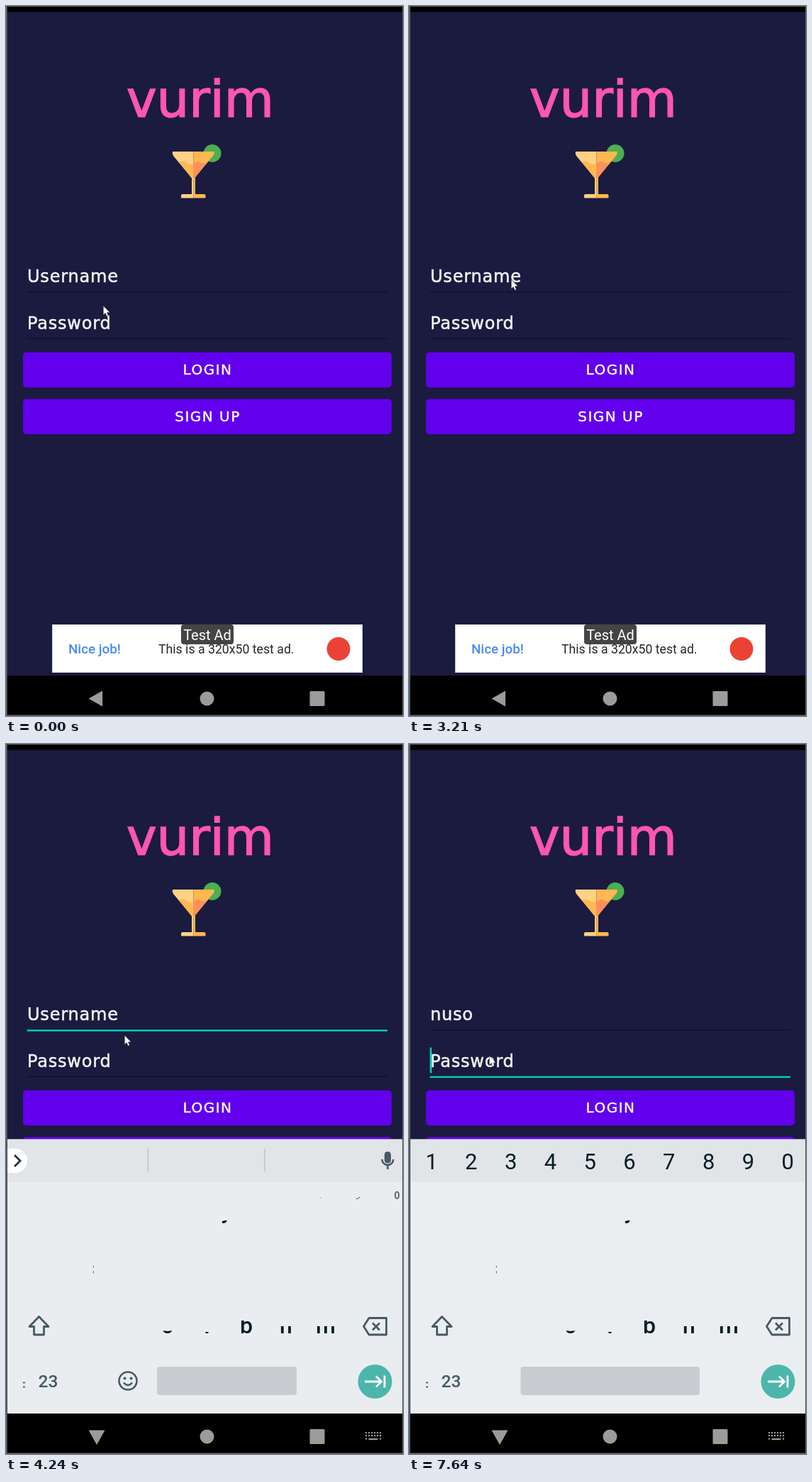
Write an HTML page with a canvas that moves like this. It is 560 px wide and 1000 px high and loops after 8 s.

```html
<!DOCTYPE html>
<html lang="en">
<head>
<meta charset="utf-8">
<title>Login screen</title>
<style>
html, body { margin: 0; width: 100%; height: 100%; overflow: hidden; background: #1b1b3f; }
canvas { display: block; width: 560px; height: 1000px; }
</style>
</head>
<body>
<canvas id="stage" width="560" height="1000"></canvas>
<script>
const screen2d = document.getElementById('stage').getContext('2d');
const layer = new OffscreenCanvas(560, 1000).getContext('2d');
let ctx = screen2d;

const LOOP = 8000, TICK = LOOP / 60, BLINK = 500;
const WIDE = '"DejaVu Sans", sans-serif';
const UI = 'Roboto, sans-serif';
const TEAL = '#00d3bb', SLATE = '#455a64', INK = '#0b1c24', NAV = '#9b9b9b';
const NAME = 'nuso';

// Moments of the story, in ms.
const FOCUS_NAME = 3590, NAV_OPEN = 3970, RISE = 4120, RISEN = 4240;
const KEYS = [4390, 5350, 5500, 5750];
const FOCUS_SECRET = 7520, DIGITS = 7640;

// Pointer tip as [tick, x, y]; between ticks 5 and 17 it swirls instead.
const PATH = [
  [0, 137, 422], [3, 269, 808], [5, 160, 838], [17, 274, 838], [19, 247, 897],
  [21, 173, 503], [24, 144, 385], [28, 167, 410], [51, 167, 410], [54, 113, 439]
];

function pointerAt(t) {
  const k = Math.floor((t + 20) / TICK);
  if (k >= 5 && k <= 17) {
    return [220 + 9.5 * (k - 5) - 60 * Math.cos(Math.PI * (k - 5) / 2),
      865 + 54 * Math.cos(2 * Math.PI * (k - 10) / 3)];
  }
  const next = PATH.findIndex(p => p[0] > k);
  if (next < 0) return PATH.at(-1).slice(1);
  const [k0, x0, y0] = PATH[next - 1], [k1, x1, y1] = PATH[next];
  const f = (k - k0) / (k1 - k0);
  return [x0 + (x1 - x0) * f, y0 + (y1 - y0) * f];
}

// The caret restarts its blink at every focus and key press.
function caretOn(t) {
  const last = [FOCUS_NAME, ...KEYS, FOCUS_SECRET].filter(e => e <= t).pop();
  return Math.floor((t - last) / BLINK) % 2 === 0;
}

function rect(x, y, w, h, color) {
  ctx.fillStyle = color;
  ctx.fillRect(x, y, w, h);
}

function round(x, y, w, h, r, color) {
  ctx.fillStyle = color;
  ctx.beginPath();
  ctx.roundRect(x, y, w, h, r);
  ctx.fill();
}

function disc(x, y, r, color) {
  ctx.fillStyle = color;
  ctx.beginPath();
  ctx.arc(x, y, r, 0, Math.PI * 2);
  ctx.fill();
}

function shape(d, color) {
  ctx.fillStyle = color;
  ctx.fill(new Path2D(d));
}

function line(d, color, width) {
  ctx.strokeStyle = color;
  ctx.lineWidth = width;
  ctx.stroke(new Path2D(d));
}

function text(s, x, y, font, color, align = 'left', spacing = 0) {
  ctx.font = font;
  ctx.fillStyle = color;
  ctx.textAlign = align;
  ctx.letterSpacing = spacing + 'px';
  ctx.fillText(s, x, y);
  return ctx.measureText(s).width;
}

// Wide lettering, thickened a little by an outline.
function wideText(s, x, y, size, color, align, spacing) {
  const width = text(s, x, y, size + 'px ' + WIDE, color, align, spacing);
  ctx.strokeStyle = color;
  ctx.lineWidth = size * 0.022;
  ctx.strokeText(s, x, y);
  return width;
}

// Only the band of the glyph between top and bottom is visible.
function band(s, x, y, top, bottom) {
  ctx.save();
  ctx.beginPath();
  ctx.rect(0, top, 560, bottom - top);
  ctx.clip();
  text(s, x, y, '500 32px ' + UI, INK, 'center');
  ctx.restore();
}

function drawGlass() {
  disc(291, 207.5, 12.5, '#4caf50');
  shape('M235 205H264.5V244Q262 243 260 240L236 211Q234 208 235 205Z', '#ffd184');
  shape('M264.5 205H294Q294 209 292 211L268 240Q266 243 264.5 244Z', '#ffb74f');
  shape('M244 220Q250 217 255 221T264.5 222V244Q262 243 260 240Z', '#ffb750');
  shape('M264.5 222Q269 217 274 220T284 220L268 240Q266 243 264.5 244Z', '#ff8f5c');
  rect(262, 242, 2.5, 24, '#ffd184');
  rect(264.5, 242, 2.5, 24, '#ffb74f');
  round(247, 265, 17.5, 5.5, [2, 0, 0, 1], '#ffd184');
  round(264.5, 265, 17, 5.5, [0, 2, 1, 0], '#ffb74f');
}

function drawField(typed, hint, y, focused, caret) {
  const width = wideText(typed || hint, 30, y, 24, '#f4f4f8', 'left', 0.8);
  if (focused && typed) rect(30, y + 0.5, width, 1.5, '#f4f4f8');
  if (focused) rect(29.5, y + 13.3, 508.5, 2.4, TEAL);
  else rect(29.5, y + 13.3, 508.5, 1.3, '#0f0f26');
  if (focused && caret) rect(typed ? 29.5 + width : 29.5, y - 27, 2.5, 36, TEAL);
}

function drawButton(label, y) {
  round(24, y + 1.5, 520, 50, 5, 'rgba(0,0,0,.15)');
  round(24, y, 520, 49.7, 5, '#6200ee');
  wideText(label, 284.5, y + 31.3, 20, '#fff', 'center', 1.5);
}

function drawAd() {
  rect(65, 871, 438, 68, '#dcdcec');
  rect(66, 872, 436, 66, '#fff');
  text('Nice job!', 88, 912, '500 18.8px ' + UI, '#4a8af4');
  text('This is a 320x50 test ad.', 215, 912, '17.7px ' + UI, '#26282b');
  disc(469, 905.5, 16.5, '#ea4335');
  round(247, 871, 74, 28, 4, '#444');
  text('Test Ad', 284, 893, '20px ' + UI, '#fff', 'center');
}

function drawSuggestions(typing) {
  round(2, 570, 28, 34, [0, 17, 17, 0], '#fff');
  line('M12 579L20 587L12 595', '#263238', 2.8);
  rect(199.5, 570, 1.5, 32, '#c0c4c7');
  rect(364, 570, 1.5, 32, '#c0c4c7');
  if (typing) text('d', 457, 597, '25px ' + UI, '#59666c', 'center');
  round(533.8, 574, 9.2, 16.5, 4.6, SLATE);
  line('M530.5 585A7.9 8 0 0 0 546.3 585M538.4 593V599', SLATE, 2.6);
  text('0', 551.5, 641, 'bold 14px ' + UI, '#5c686e', 'center');
  rect(443.5, 638.5, 1, 1, '#5c686e');
  line('M494 640.5Q497 641 499 638', '#5c686e', 1.2);
}

function drawDigits() {
  for (let i = 0; i < 10; i++) {
    text(String((i + 1) % 10), 32 + i * 55.8, 599, '31px ' + UI, INK, 'center');
  }
}

function drawKeys() {
  band('y', 311, 669, 671, 678);
  rect(122.8, 735, 1, 2.5, SLATE);
  rect(122.8, 742.5, 1, 3, SLATE);
  band('c', 227.5, 830, 826.5, 832);
  band('v', 283.5, 830, 828, 831);
  band('b', 339, 830, 812, 832);
  band('n', 395, 830, 820, 831);
  band('m', 451, 830, 820, 831);
  ctx.lineJoin = 'round';
  line('M46.5 806.5L60 820.5H53.5V832H39.5V820.5H33Z', SLATE, 2.8);
  line('M512 808.5H536.5V832H512L504.5 820.3Z', SLATE, 2.8);
  ctx.lineJoin = 'miter';
  line('M517 815.5L527 825.5M527 815.5L517 825.5', SLATE, 2.8);
  rect(24, 898.5, 2.8, 2, SLATE);
  rect(24, 904.5, 2.8, 2, SLATE);
  text('23', 45.5, 906, '500 24.5px ' + UI, SLATE);
  disc(520.5, 898, 24, '#4db6ac');
  line('M506 898H529M522 890.5L529.5 898L522 905.5M534 889.5V906.5', '#fff', 2.8);
}

function drawSmiley() {
  line('M184.5 897A12.5 12.5 0 1 1 159.5 897A12.5 12.5 0 1 1 184.5 897', SLATE, 2.6);
  disc(167.5, 893.5, 2, SLATE);
  disc(176.5, 893.5, 2, SLATE);
  line('M166 899.5Q172 906.5 178 899.5', SLATE, 2.4);
}

function drawKeyboard(t) {
  const secret = t >= DIGITS;
  const spaceX = secret ? 157.5 : 213;
  rect(2, 556.5, 557, 61, '#e1e5e8');
  rect(2, 617, 557, 326, secret ? '#ebeef0' : '#e9edf0');
  if (secret) {
    drawDigits();
  } else {
    drawSuggestions(t >= KEYS[0]);
    drawSmiley();
  }
  drawKeys();
  round(spaceX, 877, 410 - spaceX, 40, 4, '#c8ccd0');
}

// The rising keyboard is faded as one sheet.
function drawRisingKeyboard(t) {
  ctx = layer;
  ctx.clearRect(0, 0, 560, 1000);
  drawKeyboard(t);
  ctx = screen2d;
  ctx.globalAlpha = 0.87;
  ctx.drawImage(layer.canvas, 0, 11);
  ctx.globalAlpha = 1;
}

function drawNav(open) {
  shape(open ? 'M116.5 966.5H139.5L128 987Z' : 'M116.5 975.5L136 964.5V986.5Z', NAV);
  disc(283.5, 975.5, 10, NAV);
  round(428.5, 965, 21, 21, 1.5, NAV);
  if (!open) return;
  for (let i = 0; i < 12; i++) {
    rect(507 + (i % 6) * 4, i < 6 ? 969 : 973, 2.2, 2.2, NAV);
  }
  rect(507, 977.5, 2.2, 2.2, NAV);
  rect(511.5, 978, 13, 2.2, NAV);
  rect(527, 977.5, 2.2, 2.2, NAV);
}

function drawPointer(t) {
  const arrow = 'M.3 .3V13.2L3.2 10.5L5.2 15.2L7.4 14.2L5.4 9.7H9.5Z';
  ctx.save();
  ctx.translate(...pointerAt(t));
  shape(arrow, '#fff');
  line(arrow, 'rgba(0,0,0,.55)', 0.7);
  ctx.restore();
}

function drawFrame() {
  rect(0, 0, 560, 8.5, '#000');
  rect(0, 0, 560, 1, '#555');
  rect(0, 0, 1.7, 1000, '#626266');
  rect(559, 0, 1, 1000, '#555');
  rect(0, 998.5, 560, 1.5, '#666');
}

function draw(t) {
  const typed = NAME.slice(0, KEYS.filter(k => k <= t).length);
  const onSecret = t >= FOCUS_SECRET, onName = t >= FOCUS_NAME && !onSecret;
  rect(0, 0, 560, 1000, '#1b1b3f');
  wideText('vurim', 274, 156, 72, '#ff55b3', 'center', 0);
  drawGlass();
  drawField(typed, 'Username', 389, onName, caretOn(t));
  drawField('', 'Password', 454.5, onSecret, caretOn(t));
  drawButton('LOGIN', 487.8);
  drawButton('SIGN UP', 553.5);
  drawAd();
  rect(0, 943, 560, 57, '#000');
  if (t >= RISEN) drawKeyboard(t);
  else if (t >= RISE) drawRisingKeyboard(t);
  drawNav(t >= NAV_OPEN);
  drawFrame();
  drawPointer(t);
}

function tick() {
  draw(performance.now() % LOOP);
  requestAnimationFrame(tick);
}
tick();
</script>
</body>
</html>
```
